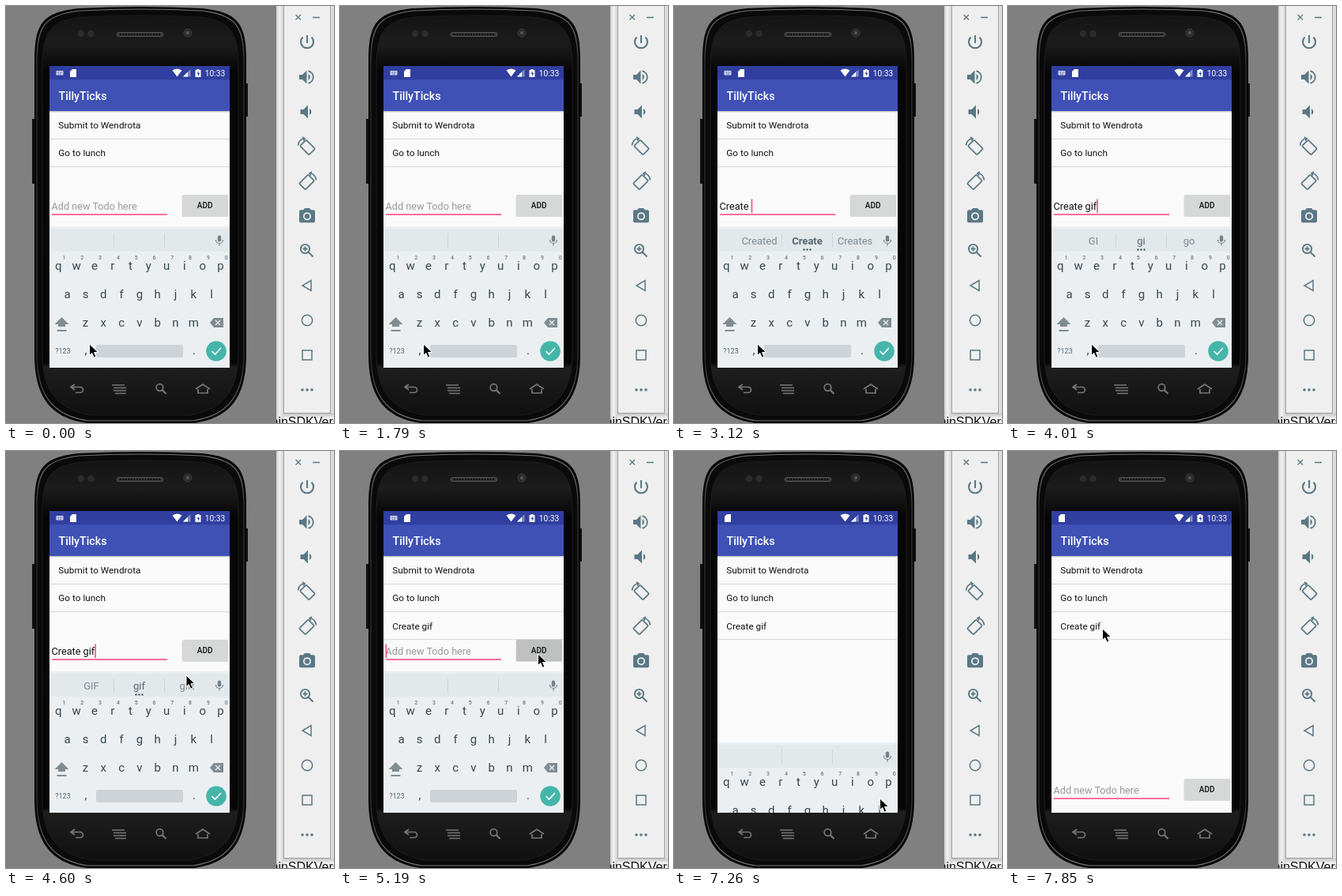
Animation, 415 px wide and 528 px high, one loop 8 s. Source, as an HTML page:

```html
<!DOCTYPE html>
<html lang="en">
<head>
<meta charset="utf-8">
<title>Todo app</title>
<style>
  html, body { margin: 0; width: 100%; height: 100%; overflow: hidden; background: #808080; }
  svg { display: block; width: 415px; height: 528px; }
  text { font-family: Roboto, sans-serif; white-space: pre; }
  .mid { text-anchor: middle; }
  .line { fill: none; stroke: currentColor; }
  .item { font-size: 11.8px; fill: #111; }
  .key { font-size: 15px; fill: #37474f; }
  .hint { font-size: 7px; font-weight: 500; fill: #6b7a82; }
  .word { font-size: 13px; fill: #7d8c94; }
</style>
</head>
<body>
<svg viewBox="0 0 415 528">
  <defs>
    <clipPath id="screen"><rect x="55" y="76" width="228" height="382"/></clipPath>
    <linearGradient id="edge">
      <stop offset="0" stop-color="#cfcfcf"/><stop offset=".45" stop-color="#f2f2f2"/><stop offset="1" stop-color="#d2d2d2"/>
    </linearGradient>
    <linearGradient id="shade" x2="0" y2="1">
      <stop offset="0" stop-opacity=".22"/><stop offset="1" stop-opacity="0"/>
    </linearGradient>
    <linearGradient id="rim" x2="0" y2="1">
      <stop offset="0" stop-color="#777"/><stop offset=".14" stop-color="#333"/>
      <stop offset=".86" stop-color="#333"/><stop offset="1" stop-color="#777"/>
    </linearGradient>
    <linearGradient id="glass" x2="0" y2="1">
      <stop offset="0" stop-color="#141414"/><stop offset=".07" stop-color="#1c1c1c"/><stop offset=".14" stop-color="#060606"/>
      <stop offset=".87" stop-color="#060606"/><stop offset=".88" stop-color="#1e1e1e"/><stop offset="1" stop-color="#101010"/>
    </linearGradient>
  </defs>

  <!-- emulator side panel -->
  <rect x="330" width="85" height="528" fill="#fafafa"/>
  <rect x="342" width="9" height="528" fill="url(#edge)"/>
  <rect x="411" width="4" height="516" fill="#dcdcdc"/>
  <rect x="351" y="516" width="64" height="7" fill="url(#shade)"/>
  <text x="335.500" y="531.500" font-size="16" style="font-family:'Liberation Sans',Arial,sans-serif" fill="#111">ninSDKVersion</text>
  <rect x="351.500" y="-2" width="59" height="517.500" fill="#efefef" stroke="#a2a2a2"/>
  <g color="#5a7885" fill="currentColor">
    <path class="line" d="M366.500 11l6.500 6.500M373 11l-6.500 6.500M388 14.500h9" stroke-width="1.300"/>
    <path class="line" d="M381 37v10M375.500 39.500a8 8 0 1 0 11 0" stroke-width="2.100"/>
    <path d="M371 87v6h4l5.500 5.500v-17L375 87zM382.500 86a4.500 4.500 0 0 1 0 8z"/>
    <path class="line" d="M382.500 82.200a8 8 0 0 1 0 15.600" stroke-width="1.900"/>
    <path d="M372.500 131v6h4l5.500 5.500v-17l-5.500 5.500zM384 130a4.500 4.500 0 0 1 0 8z"/>
    <g id="turn" class="line" stroke-width="1.700">
      <rect x="-5.500" y="-8" width="11" height="16" rx="1.200" transform="translate(1.500 1) rotate(-45)"/>
      <path d="M-10.500-1.500a10.500 10.500 0 0 1 8-9M-5-12l3 1.700-1.700 3"/>
    </g>
    <path fill-rule="evenodd" d="M378 256h6l2 2.200h3q2 0 2 2v12q0 2-2 2h-16q-2 0-2-2v-12q0-2 2-2h3zM381 261.200a5 5 0 1 0 .01 0z"/>
    <circle cx="381" cy="266.200" r="3.200"/>
    <g class="line" stroke-width="1.900">
      <circle cx="378.500" cy="307.500" r="5.600"/><path d="M382.500 311.500l6 6M375.500 307.500h6M378.500 304.500v6"/>
    </g>
    <g class="line" stroke-width="1.500">
      <path d="M386 347.500v13l-11-6.500z"/><circle cx="381" cy="398" r="6.700"/>
      <rect x="375" y="436" width="12" height="12"/>
    </g>
    <circle cx="375" cy="486" r="1.800"/><circle cx="381" cy="486" r="1.800"/><circle cx="387" cy="486" r="1.800"/>
  </g>

  <!-- desktop and phone body -->
  <rect width="342" height="528" fill="#808080"/>
  <path d="M33 143h4v82h-4zM303 98h3v42h-3z" fill="#111"/>
  <path d="M36 70C36 22 46 8 92 3Q170-1 248 3C294 8 304 22 304 70V440C304 490 288 521 238 528H102C52 521 36 490 36 440Z" fill="#050505"/>
  <path d="M39 70C39 25 49 11 93 6Q170 2 247 6C291 11 301 25 301 70V440C301 488 285 518 237 525H103C55 518 39 488 39 440Z" fill="#0a0a0a" stroke="url(#rim)" stroke-width="1.200"/>
  <path d="M46 80C46 33 55 19 96 14Q170 10 244 14C285 19 294 33 294 80V440C294 482 279 511 232 518H108C61 511 46 482 46 440Z" fill="url(#glass)" stroke="#1d1d1d"/>
  <rect x="140" y="33.500" width="59" height="5" rx="2.500" fill="#333" stroke="#565656"/>
  <path d="M144 36h51" stroke="#0d0d0d" stroke-width="2" stroke-dasharray="2 1.500"/>
  <g fill="#2b2b2b">
    <circle cx="95" cy="35" r="4.300"/><circle cx="107.500" cy="35" r="4.300"/>
    <circle cx="230" cy="34" r="5" stroke="#3c3c3c"/>
  </g>
  <circle cx="230" cy="34" r="2.200" fill="#4a545c"/>
  <g class="line" color="#777" stroke-width="1.700">
    <path d="M87 479l-5 3.500 5 3.500M82 482.500h12a3.500 3.500 0 0 1 0 7h-6"/>
    <path d="M134 480h16M136 483.500h16M136 487h16M138 490.500h14" stroke-width="1.300"/>
    <circle cx="194.500" cy="483" r="4.300"/><path d="M197.500 486l5 5" stroke-width="2.200"/>
    <path d="M240 485l9-6 9 6M243 485v5h12v-5"/>
  </g>

  <!-- app screen -->
  <g clip-path="url(#screen)">
    <rect x="55" y="76" width="228" height="382" fill="#fafafa"/>
    <rect x="55" y="133" width="228" height="2.500" fill="url(#shade)"/>
    <rect x="55" y="93" width="228" height="40" fill="#3f51b5"/>
    <rect x="55" y="76" width="228" height="17.200" fill="#303f9f"/>
    <text x="66.500" y="118.700" font-size="14.250" font-weight="500" fill="#fff">TillyTicks</text>
    <g fill="#fff">
      <g id="kbIcon">
        <rect x="63.500" y="82" width="9" height="5.600" rx=".8" opacity=".85"/>
        <path d="M64.500 83.600h7M64.500 85h7M66 86.400h4" stroke="#303f9f" stroke-width=".7" stroke-dasharray="1 .5"/>
      </g>
      <path id="sd" d="M84 80h5v10h-8v-7z"/>
      <path d="M210.500 81.500q6-4 12 0l-6 8z"/>
      <path d="M233.500 80v9.500h-9.500z" opacity=".4"/><path d="M230 83.500v6h-6z"/>
      <path d="M241.500 80h3v1h2v9h-7v-9h2z"/>
      <path d="M243.700 82l-2 4h1.500v3l2-4h-1.500z" fill="#303f9f"/>
      <text x="251.800" y="88.600" font-size="10.200">10:33</text>
    </g>
    <path d="M55 168.500h228M55 203.500h228" stroke="#d8d8d8"/>
    <text class="item" x="66.300" y="155">Submit to Wendrota</text>
    <text class="item" x="66.300" y="190.300">Go to lunch</text>
    <g id="added">
      <path d="M55 238.500h228" stroke="#d8d8d8"/>
      <text class="item" x="66.300" y="225.500">Create gif</text>
    </g>
    <g id="entry">
      <text id="hint" x="57.500" y="258" font-size="12.700" fill="#999">Add new Todo here</text>
      <text id="typed" x="57.500" y="258" font-size="12.700" fill="#111"></text>
      <path d="M58 264h146" stroke="#ff4081" stroke-width="1.500"/>
      <rect id="caret" x="57.600" y="244.500" width="1.500" height="17.500" fill="#ff4081"/>
      <rect x="222.500" y="240" width="59" height="27" rx="2" opacity=".13"/>
      <rect id="button" x="223" y="239" width="58" height="27" rx="1.500"/>
      <text class="mid" x="251.700" y="256.200" font-size="10" font-weight="500" fill="#111">ADD</text>
    </g>

    <g id="keyboard">
      <rect x="55" y="279" width="228" height="180" fill="#ebeff2"/>
      <rect x="55" y="282" width="228" height="29" fill="#e3e8eb"/>
      <path d="M136.500 288v18M200.500 288v18" stroke="#cfd6da"/>
      <g id="words"></g>
      <g id="dots" fill="#455a64">
        <circle cx="164.500" cy="308.500" r="1.200"/><circle cx="168.500" cy="308.500" r="1.200"/><circle cx="172.500" cy="308.500" r="1.200"/>
      </g>
      <g color="#71828a">
        <rect x="267.800" y="290.500" width="4.400" height="8" rx="2.200" fill="currentColor"/>
        <path class="line" d="M265.500 296a4.500 4.500 0 0 0 9 0M270 300.500v3" stroke-width="1.200"/>
      </g>
      <g id="keys"></g>
      <path d="M70.500 394l9 9h-4.500v3h-9v-3h-4.500zM64.500 410h12v2h-12z" fill="#7f8c92"/>
      <path d="M263 395h12v12h-12l-5-6z" fill="#7f8c92"/>
      <path d="M265 398l6 6M271 398l-6 6" stroke="#ebeff2" stroke-width="1.400"/>
      <text class="mid" x="72" y="440.300" font-size="9" fill="#546770">?123</text>
      <rect x="114" y="429" width="110" height="16" rx="2" fill="#cdd3d6"/>
      <circle cx="266" cy="437" r="12.800" fill="#45b5aa"/>
      <path class="line" d="M260.500 437l4 4 7.500-8" color="#fff" stroke-width="1.700"/>
    </g>
  </g>

  <path id="pointer" d="M0 0V14.500l3.300-3 2.400 5.700 2.700-1.100-2.400-5.500h5z" fill="#000" stroke="#fff" stroke-width="1" stroke-linejoin="round"/>
</svg>

<script>
const $ = id => document.getElementById(id);
const NS = 'http://www.w3.org/2000/svg';
const LOOP = 8000;

function label(parent, cls, x, y, str) {
  const el = document.createElementNS(NS, 'text');
  el.setAttribute('class', 'mid ' + cls);
  el.setAttribute('x', x);
  el.setAttribute('y', y);
  el.textContent = str;
  parent.append(el);
  return el;
}

const PITCH = 22.8;
[['qwertyuiop', 66.3, 333.5], ['asdfghjkl', 77.7, 370], ['zxcvbnm', 100.5, 406]].forEach(([row, x, y]) =>
  [...row].forEach((ch, i) => label($('keys'), 'key', x + i * PITCH, y, ch)));
[...'1234567890'].forEach((ch, i) => label($('keys'), 'hint', 73.5 + i * PITCH, 320.5, ch));
label($('keys'), 'key', 101, 441, ',');
label($('keys'), 'key', 238, 441, '.');
const words = [108, 168.5, 229].map(x => label($('words'), 'word', x, 301.7, ''));
words[1].style.fill = '#546770';

const turn = $('turn');
const mirrored = turn.cloneNode(true);
mirrored.removeAttribute('id');
turn.setAttribute('transform', 'translate(380 178)');
mirrored.setAttribute('transform', 'translate(382 222) scale(-1 1)');
turn.after(mirrored);

const start = { text: '', caret: 0, words: '', bold: 0, dots: 0, at: [105.5, 428], added: 0, press: 0, low: 0, slide: 0 };

// Each step holds until the next one.
const steps = [
  [300, { caret: 1 }], [750, { caret: 0 }], [1190, { caret: 1 }], [1790, { caret: 0 }],
  [2240, { text: 'C', caret: 1 }],
  [2390, { text: 'Cr', words: 'Can C Call', dots: 1 }],
  [2540, { text: 'Cre', words: 'Cr CR Car' }],
  [2690, { text: 'Crea', words: 'Cre Are Crew' }],
  [2840, { text: 'Creat', words: 'Cream Crea Create' }],
  [2970, { text: 'Create', words: 'Creat Create Great', bold: 1 }],
  [3120, { text: 'Create ', words: 'Created Create Creates' }],
  [3420, { words: 'a the new', bold: 0, dots: 0 }],
  [3710, { text: 'Create g' }],
  [3860, { text: 'Create gi', words: 'g go get', dots: 1 }],
  [4010, { text: 'Create gif', words: 'GI gi go' }],
  [4160, { words: 'GIF gif gift' }],
  [4310, { at: [124, 404] }], [4450, { at: [176, 340] }], [4600, { at: [228, 284] }],
  [4750, { at: [250, 261] }], [4900, { at: [250.5, 257] }],
  [5190, { text: '', words: '', dots: 0, added: 1, press: 1 }],
  [5640, { caret: 0 }], [5790, { press: 0 }],
  [5930, { at: [252, 240] }], [6080, { at: [254, 227] }],
  [6230, { at: [257, 300], caret: 1 }], [6380, { at: [260, 400] }],
  [6520, { at: [260.5, 450] }], [6670, { at: [260.5, 449], caret: 0 }], [6810, { at: [260.5, 440] }],
  [7110, { caret: 1 }], [7260, { low: 1, slide: 90 }],
  [7410, { slide: 180, at: [244, 405] }], [7550, { at: [192, 322], caret: 0 }],
  [7700, { at: [142, 252] }], [7850, { at: [119.5, 225] }]
];

const show = (id, on) => { $(id).style.display = on ? '' : 'none'; };
const move = (id, x, y) => $(id).setAttribute('transform', `translate(${x} ${y})`);

function draw(t) {
  const s = Object.assign({}, start, ...steps.filter(([at]) => at <= t).map(step => step[1]));
  $('typed').textContent = s.text;
  show('hint', !s.text);
  show('caret', s.caret);
  move('caret', s.text ? $('typed').getComputedTextLength() : 0, 0);

  const list = s.words.split(' ');
  words.forEach((el, i) => { el.textContent = list[i] || ''; });
  words[1].style.fontWeight = s.bold ? 700 : 400;
  show('dots', s.dots);

  show('added', s.added);
  $('button').setAttribute('fill', s.press ? '#bfc0c0' : '#d6d7d7');
  move('entry', 0, s.low ? 176 : 0);
  move('keyboard', 0, s.slide);
  show('kbIcon', !s.low);
  move('sd', s.low ? -17 : 0, 0);
  move('pointer', ...s.at);
}

function tick() {
  draw(performance.now() % LOOP);
  requestAnimationFrame(tick);
}
tick();
</script>
</body>
</html>
```
